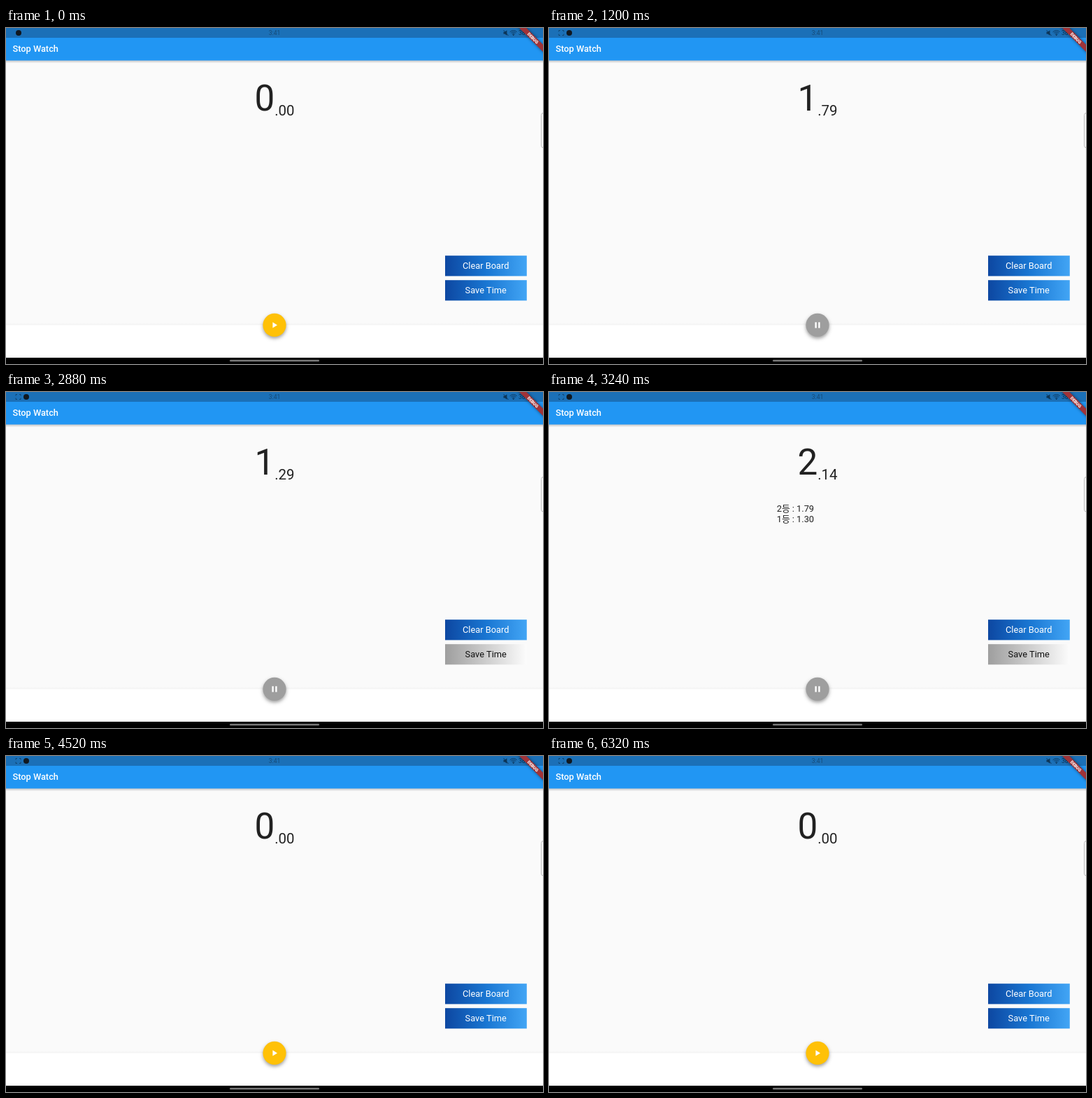
Write an HTML page with a canvas that moves like this. It is 768x480 px and loops after 6360 ms.

```html
<!DOCTYPE html>
<html lang="ko">
<head>
<meta charset="utf-8">
<title>Stop Watch</title>
<style>
html, body { margin: 0; width: 100%; height: 100%; overflow: hidden; background: #fafafa; }
canvas { display: block; width: 768px; height: 480px; }
</style>
</head>
<body>
<canvas id="stage" width="768" height="480"></canvas>
<script>
const ctx = document.getElementById('stage').getContext('2d');
const LOOP = 6360, STEP = 40, RATE = 2.357;
const FONT = 'Roboto, "Noto Sans CJK KR", "Noto Sans CJK", sans-serif';
const INK = '#212121', STATUS_INK = '#0c3558';

// Each run counts from start, holds at pause and is wiped at clear.
const runs = [
  { start: 439, pause: 1500, clear: 1880, laps: [] },
  { start: 2331, pause: 3960, clear: 4300, laps: [1.30, 1.79, 2.19, 2.68] }
];
const IDLE_SAVE = 5140, IDLE_CLEAR = 5560;

const lapTime = (run, value) => run.start + value * 1000 / RATE;
const saves = runs.flatMap(r => r.laps.map(v => lapTime(r, v))).concat(IDLE_SAVE);
const clears = runs.map(r => r.clear).concat(IDLE_CLEAR);
const pressed = (times, t) => times.some(at => t >= at - 45 && t < at + 35);

function stateAt(t) {
  const run = runs.find(r => t >= r.start && t < r.clear);
  let laps = [];
  if (run) laps = run.laps.filter(v => t >= lapTime(run, v));
  else if (t >= IDLE_SAVE && t < IDLE_CLEAR) laps = [0];
  return {
    centis: run ? Math.floor((Math.min(t, run.pause) - run.start) * RATE / 10) : 0,
    running: !!run && t < run.pause,
    laps
  };
}

function rect(x, y, w, h, fill) {
  ctx.fillStyle = fill;
  ctx.fillRect(x, y, w, h);
}

function disc(x, y, r, fill) {
  ctx.fillStyle = fill;
  ctx.beginPath();
  ctx.arc(x, y, r, 0, Math.PI * 2);
  ctx.fill();
}

function poly(points, fill) {
  ctx.fillStyle = fill;
  ctx.beginPath();
  points.forEach(([x, y]) => ctx.lineTo(x, y));
  ctx.closePath();
  ctx.fill();
}

function text(str, x, y, size, fill, align = 'left', weight = 400) {
  ctx.font = `${weight} ${size}px ${FONT}`;
  ctx.textAlign = align;
  ctx.fillStyle = fill;
  ctx.fillText(str, x, y);
}

function fade(y, h, from, to) {
  const g = ctx.createLinearGradient(0, y, 0, y + h);
  g.addColorStop(0, from);
  g.addColorStop(1, to);
  rect(0, y, 768, h, g);
}

function shadow(color, blur, dy) {
  ctx.shadowColor = color;
  ctx.shadowBlur = blur;
  ctx.shadowOffsetY = dy;
}

function statusBar(t) {
  rect(0, 0, 768, 14, '#1b70b7');
  const k = Math.max(0, Math.min(1, (t - 680) / 120));
  disc(18 + 11 * k, 7, 4, '#101820');
  if (k > 0) {
    ctx.globalAlpha = k * 0.7;
    ctx.strokeStyle = STATUS_INK;
    ctx.lineWidth = 1;
    ctx.beginPath();
    for (const sx of [-1, 1]) for (const sy of [-1, 1]) {
      const x = 17.5 + sx * 3.5, y = 7 + sy * 3.5;
      ctx.moveTo(x - sx * 2, y);
      ctx.lineTo(x, y);
      ctx.lineTo(x, y - sy * 2);
    }
    ctx.stroke();
    ctx.globalAlpha = 1;
  }
  text('3:41', 384, 10.2, 8.6, '#164a76', 'center');

  // muted speaker
  poly([[711.5, 5.6], [713.4, 5.6], [716.4, 3.2], [716.4, 10.8], [713.4, 8.5], [711.5, 8.5]], STATUS_INK);
  ctx.strokeStyle = STATUS_INK;
  ctx.lineWidth = 0.9;
  ctx.beginPath();
  ctx.moveTo(711.5, 3);
  ctx.lineTo(718.5, 11);
  ctx.stroke();

  // wifi
  for (const r of [2.6, 4.8, 7]) {
    ctx.beginPath();
    ctx.arc(725.7, 10.6, r, -Math.PI * 0.76, -Math.PI * 0.24);
    ctx.stroke();
  }
  disc(725.7, 10, 0.9, STATUS_INK);
  text('38%', 733, 10.2, 8.6, STATUS_INK);
}

function appBar() {
  rect(0, 14, 768, 32.5, '#2196f3');
  fade(46.5, 4, 'rgba(0,0,0,.2)', 'rgba(0,0,0,0)');
  text('Stop Watch', 9.4, 34.4, 12.8, '#fff', 'left', 500);
}

function ribbon() {
  ctx.save();
  ctx.translate(768, 0);
  ctx.rotate(Math.PI / 4);
  shadow('rgba(0,0,0,.5)', 4, 0);
  rect(-28, 16.8, 56, 7.2, '#a03338');
  shadow('transparent', 0, 0);
  text('DEBUG', 0, 22.6, 6.1, '#fff', 'center', 900);
  ctx.restore();
}

function button(label, y, down) {
  const g = ctx.createLinearGradient(628, 0, 745, 0);
  const stops = down ? ['#9e9e9e', '#cdcdcd', '#fcfcfc'] : ['#0d47a1', '#1976d2', '#42a5f5'];
  stops.forEach((c, i) => g.addColorStop(i / 2, c));
  rect(628, y, 116.8, 29.2, g);
  text(label, 686.2, y + 19.1, 12.8, down ? '#111' : '#fff', 'center');
}

function fab(running) {
  shadow('rgba(0,0,0,.38)', 5, 2.5);
  disc(384, 424.4, 16.6, running ? '#9e9e9e' : '#ffc107');
  shadow('transparent', 0, 0);
  if (running) {
    rect(380.4, 420.3, 2.4, 8.3, '#fff');
    rect(385.2, 420.3, 2.4, 8.3, '#fff');
  } else {
    poly([[381.4, 420.2], [388, 424.4], [381.4, 428.6]], '#fff');
  }
}

function sideHandle() {
  ctx.beginPath();
  ctx.roundRect(765.5, 121.5, 10, 49.5, 3);
  ctx.fillStyle = '#fff';
  ctx.fill();
  ctx.strokeStyle = '#b8b8b8';
  ctx.lineWidth = 1;
  ctx.stroke();
}

function bottomBar() {
  fade(421, 3.5, 'rgba(0,0,0,0)', 'rgba(0,0,0,.035)');
  rect(0, 424.4, 768, 47, '#fff');
  rect(0, 471, 768, 9, '#000');
  ctx.fillStyle = '#777';
  ctx.beginPath();
  ctx.roundRect(320, 474, 128, 2.4, 1.2);
  ctx.fill();
}

function draw(t) {
  const s = stateAt(t);
  rect(0, 0, 768, 480, '#fafafa');
  statusBar(t);
  appBar();
  ribbon();
  sideHandle();

  text(String(Math.floor(s.centis / 100)), 355.4, 117.6, 51.2, INK);
  text('.' + String(s.centis % 100).padStart(2, '0'), 384.2, 125.4, 20.48, INK);

  const n = s.laps.length;
  s.laps.forEach((v, i) => {
    text(`${i + 1}등 : ${v.toFixed(2)}`, 325.7, 170.7 + (n - 1 - i) * 15.15, 12.8, INK);
  });

  button('Clear Board', 325.2, pressed(clears, t));
  button('Save Time', 360.2, pressed(saves, t));
  bottomBar();
  fab(s.running);
}

let origin = null;
function tick() {
  const now = performance.now();
  if (origin === null) origin = now;
  const t = (now - origin) % LOOP;
  draw(Math.floor((t + 1) / STEP) * STEP % LOOP);
  requestAnimationFrame(tick);
}
tick();
</script>
</body>
</html>
```
